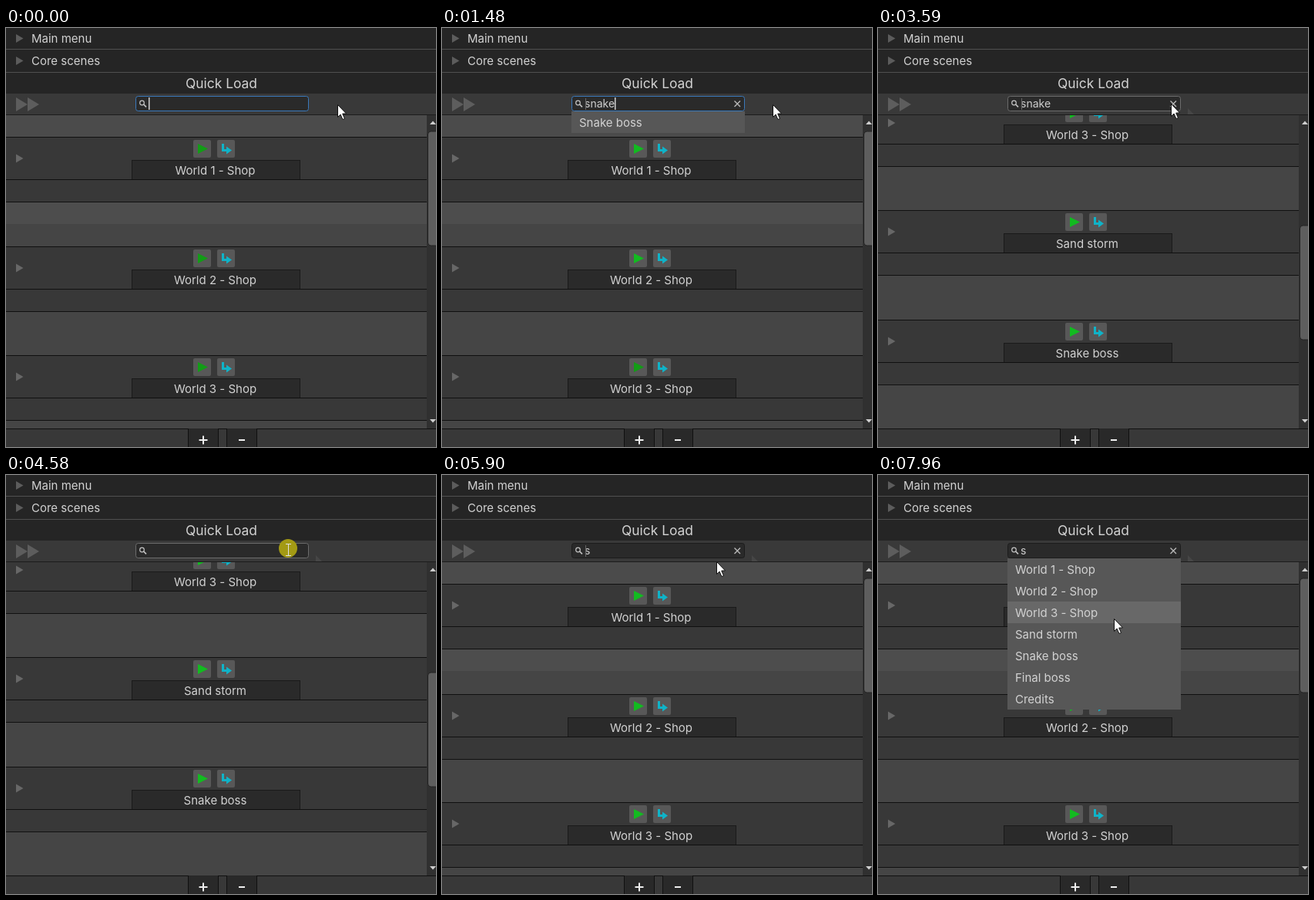
These frames come from a looping animation (558 by 543 pixels, 7.99 s). An HTML page with a canvas:

```html
<!DOCTYPE html>
<html>
<head>
<meta charset="utf-8">
<style>
html, body { margin: 0; width: 100%; height: 100%; overflow: hidden; background: #383838; }
canvas { display: block; }
</style>
</head>
<body>
<canvas id="stage" width="558" height="543"></canvas>
<script>
const c = document.getElementById('stage').getContext('2d');
const LOOP = 7990;
const scenes = ['World 1 - Shop', 'World 2 - Shop', 'World 3 - Shop', 'Sand storm', 'Snake boss', 'Final boss', 'Credits'];
const typed = [[0, ''], [300, 's'], [440, 'sn'], [580, 'sna'], [640, 'snak'], [810, 'snake'], [3860, ''], [4890, 's']];
const path = [[0, 430, 99], [1440, 430, 99], [1900, 370, 120], [3190, 370, 120], [3580, 380, 98], [3860, 380, 98],
  [4350, 366, 97], [5320, 366, 97], [5630, 356, 112], [6770, 356, 112], [7100, 344, 102], [7540, 344, 102], [7960, 306, 186]];
const clicks = [[1910, 2050], [3690, 3860], [4580, 4680], [5770, 5900], [7140, 7270]];
const menus = [[300, 2050], [4890, 5900], [7270, LOOP]];
const active = (spans, t) => spans.some(([a, b]) => t >= a && t < b);

function box(x, y, w, h, color) {
  c.fillStyle = color;
  c.fillRect(x, y, w, h);
}
function round(x, y, w, h, r, color, border) {
  c.beginPath();
  c.roundRect(x, y, w, h, r);
  c.fillStyle = color;
  c.fill();
  if (border) { c.strokeStyle = border; c.lineWidth = 1; c.stroke(); }
}
function poly(points, color, border) {
  c.beginPath();
  for (let i = 0; i < points.length; i += 2) c.lineTo(points[i], points[i + 1]);
  c.closePath();
  c.fillStyle = color;
  c.fill();
  if (border) { c.strokeStyle = border; c.lineWidth = 1; c.stroke(); }
}
function lines(color, width, ...segments) {
  c.beginPath();
  for (const [x1, y1, x2, y2] of segments) { c.moveTo(x1, y1); c.lineTo(x2, y2); }
  c.strokeStyle = color;
  c.lineWidth = width;
  c.stroke();
}
function label(str, x, y, size = 15, align = 'left', color = '#d2d2d2') {
  c.font = size + 'px Inter, sans-serif';
  c.textAlign = align;
  c.fillStyle = color;
  c.fillText(str, x, y);
}
const arrowRight = (x, y, w, h, color) => poly([x, y - h, x + w, y, x, y + h], color);

function pointer(t) {
  const i = path.findLastIndex(p => p[0] <= t);
  const a = path[i], b = path[i + 1] || a;
  let k = b === a ? 0 : (t - a[0]) / (b[0] - a[0]);
  k = k * k * (3 - 2 * k);
  return [1, 2].map(n => Math.round(a[n] + (b[n] - a[n]) * k));
}

function sceneRow(name, y, green) {
  box(0, y, 546, 85, '#383838');
  for (const dy of [0, 55, 84]) box(0, y + dy, 546, 1, '#101010');
  arrowRight(13, y + 28, 9.5, 5.5, '#676767');
  round(243, y + 4, 23, 23, 2, '#585858');
  round(274, y + 4, 23, 23, 2, '#585858');
  arrowRight(249, y + 15.5, 13, 6.5, green);
  box(280, y + 9, 3, 10, '#0fb3c8');
  box(280, y + 16, 7, 3, '#0fb3c8');
  arrowRight(286, y + 17.5, 7, 5, '#0fb3c8');
  box(163, y + 30, 219, 25, '#1a1a1a');
  box(164, y + 31, 217, 24, '#2a2a2a');
  label(name, 271.5, y + 49, 15, 'center');
}

function sceneList(t) {
  const scrolled = t >= 2050 && t < 5900;
  const scroll = scrolled ? 329 : 0;
  c.save();
  c.beginPath();
  c.rect(0, 113, 558, 406);
  c.clip();
  box(0, 113, 546, 406, '#454545');
  if (!scrolled) {
    box(0, 113, 546, 28, '#4b4b4b');
    box(0, 226, 546, 28, '#4d4d4d');
  }
  scenes.forEach((name, i) => {
    const nudge = i === 1 && t >= 2050 ? 1 : 0;
    const dim = t < 300 || (i === 2 && t < 2050);
    sceneRow(name, Math.floor(141 + i * 141.5) + (i === 1 ? 1 : 0) + nudge - scroll, dim ? '#129c16' : '#12bb20');
  });
  if (t >= 2050 && t < 3190) box(0, 180, 546, 28, '#2f2f2f');
  box(546, 113, 12, 406, '#303030');
  round(547.5, scrolled ? 256 : 134, 14, 148, 4, '#5e5e5e', '#222');
  poly([550, 125, 554, 120.5, 558, 125], '#d0d0d0');
  poly([550, 507, 558, 507, 554, 511.5], '#d0d0d0');
  c.restore();
}

function frameParts() {
  box(0, 0, 558, 85, '#252525');
  box(0, 27, 558, 1, '#505050');
  box(0, 57, 558, 1, '#505050');
  arrowRight(13, 13.5, 9.5, 5.5, '#5c5c5c');
  arrowRight(13, 42.5, 9.5, 5.5, '#5c5c5c');
  label('Main menu', 33, 19);
  label('Core scenes', 33, 48);
  label('Quick Load', 279.5, 78, 17.4, 'center');
  box(0, 85, 558, 27, '#393939');
  box(0, 112, 558, 1, '#1c1c1c');
  arrowRight(13, 99, 15, 9, '#5d5d5d');
  arrowRight(28, 99, 15, 9, '#5d5d5d');
  box(0, 519, 558, 24, '#383838');
  box(0, 519, 558, 1, '#101010');
  for (const [x, sign] of [[236, '+'], [286, '-']]) {
    box(x, 519, 40, 24, '#101010');
    box(x + 1, 519, 38, 24, '#292929');
    const mid = x + 20;
    if (sign === '+') lines('#eee', 2, [mid - 5.5, 534, mid + 5.5, 534], [mid, 528.5, mid, 539.5]);
    else lines('#eee', 2, [mid - 4, 534, mid + 4, 534]);
  }
}

function searchField(t, text, x, y) {
  const hover = x >= 168 && x < 393 && y < 108;
  round(168.5, 88.5, 224, 19, 3, '#2a2a2a', t < 2050 ? '#3a79bb' : hover ? '#6c6c6c' : '#1c1c1c');
  c.beginPath();
  c.arc(176.5, 97, 2.8, 0, 7);
  c.strokeStyle = '#c4c4c4';
  c.lineWidth = 1.2;
  c.stroke();
  lines('#c4c4c4', 1.6, [178.6, 99, 182, 102.4]);
  const selected = t >= 7140 && t < 7270;
  if (selected) box(185, 90, 7, 16, '#3d6091');
  label(text, 185, 103, 14, 'left', selected ? '#6f9bd6' : '#cfcfcf');
  if (t < 2050) {
    if (text) box(186, 91, 1, 15, '#666');
    box(text ? Math.round(185 + c.measureText(text).width) : 185, 90, 1.5, 16, '#d0d0d0');
  } else if (t < 3860 || (t >= 4680 && t < 7140)) box(186, 91, 1, 15, '#666');
  if (text) lines('#b8b8b8', 1.4, [379.5, 94.5, 387, 102], [387, 94.5, 379.5, 102]);
}

function menu(text, x, y) {
  const found = scenes.filter(name => name.toLowerCase().includes(text));
  found.forEach((name, i) => {
    const top = 108 + i * 28;
    box(168, top, 225, 28, y >= top && y < top + 28 && x < 393 ? '#686868' : '#575757');
    label(name, 178, top + 19.5);
  });
}

function drawPointer(t, x, y) {
  const beam = t >= 3860 && t < 5400 && x < 375;
  if (active(clicks, t)) {
    c.beginPath();
    c.arc(x, beam ? 95 : y, 12, 0, 7);
    c.fillStyle = '#a39a14';
    c.fill();
  }
  if (beam) {
    lines('#e0e0e0', 1, [x + .5, y - 7, x + .5, y + 7],
      [x - 3, y - 7.5, x + 4, y - 7.5], [x - 3, y + 7.5, x + 4, y + 7.5]);
  } else {
    const shape = [0, 0, 0, 16, 3.6, 12.6, 6.4, 19, 9, 18, 6.2, 11.6, 11, 11.4];
    poly(shape.map((v, i) => v + (i % 2 ? y : x) + .5), '#fff', '#111');
  }
}

function draw(now) {
  const t = now % LOOP;
  const text = typed.findLast(k => k[0] <= t)[1];
  const [x, y] = pointer(t);
  sceneList(t);
  frameParts();
  if (t >= 2050) poly([402, 104, 410, 112, 402, 112], '#464646');
  searchField(t, text, x, y);
  if (active(menus, t)) menu(text, x, y);
  drawPointer(t, x, y);
  requestAnimationFrame(draw);
}
requestAnimationFrame(draw);
</script>
</body>
</html>
```
